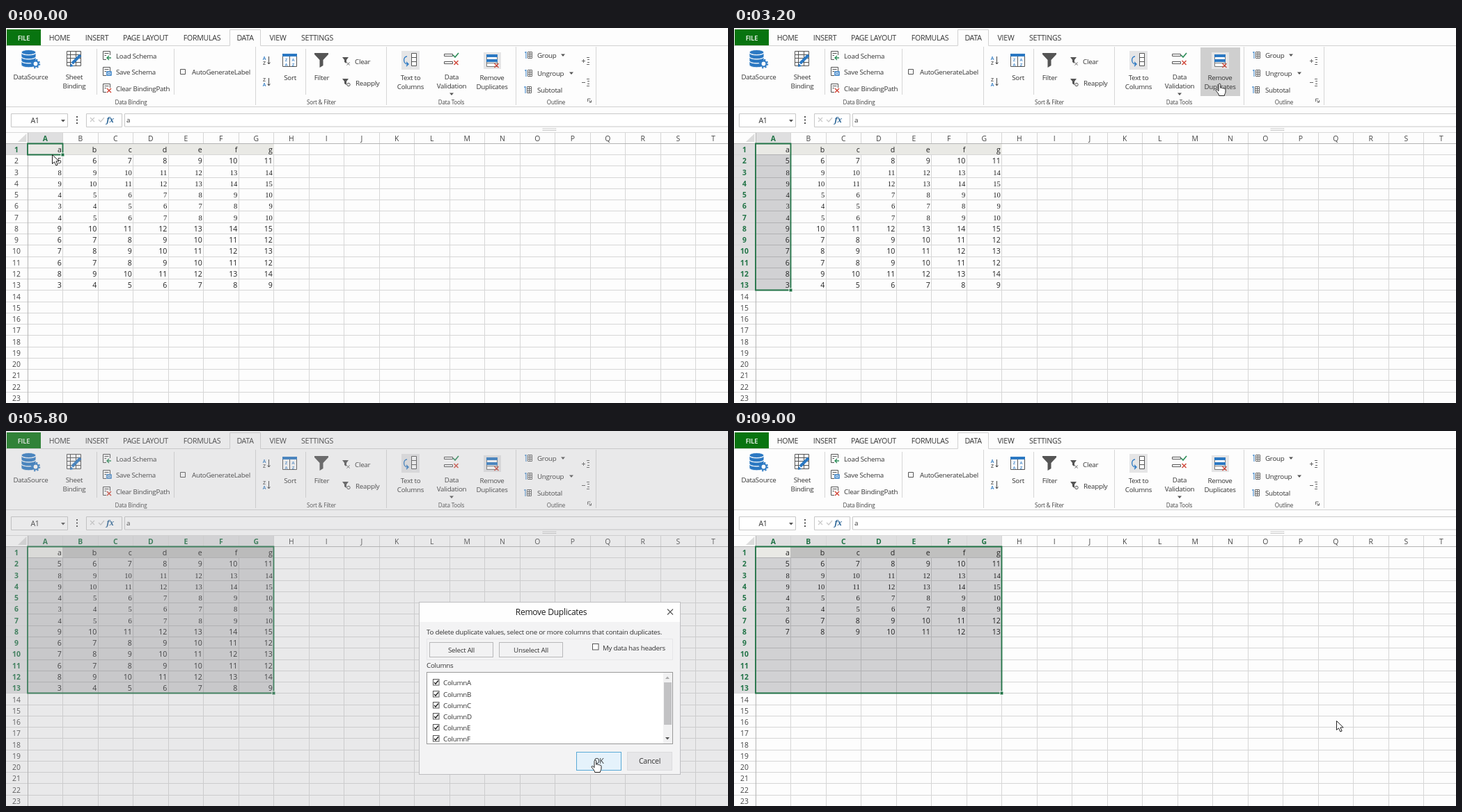
An HTML page for the animation above (9200 ms loop, 1037 by 540 pixels).

```html
<!DOCTYPE html>
<html lang="en">
<head>
<meta charset="utf-8">
<title>Remove duplicates</title>
<style>
html, body { margin: 0; width: 100%; height: 100%; overflow: hidden; background: #fdfdfd; }
svg { display: block; width: 1037px; height: 540px; }
text { font: 9.75px "Open Sans", "Noto Sans", sans-serif; letter-spacing: -.025em; fill: #333; }
.tab { font-size: 10.6px; }
.cap { font-size: 8.1px; fill: #444; }
.title { font-size: 12.1px; fill: #1c1c1c; }
.btn { font-size: 10.6px; }
.cell { font-size: 10.6px; fill: #222; letter-spacing: 0; }
.serif { font-family: "Liberation Serif", serif; }
.head { font-size: 10.4px; fill: #444; letter-spacing: 0; }
.head.on { font-weight: 700; fill: #217346; }
</style>
</head>
<body>
<svg viewBox="0 0 1037 540" xmlns="http://www.w3.org/2000/svg">
  <defs>
    <g id="doc" fill="none" stroke="#555"><path d="M.5.5h10v12h-10zM2.5 3.5h6M2.5 6.5h3"/></g>
    <path id="down" d="M-3-1.5h6L0 2z" fill="#555"/>
    <g id="outline" fill="none" stroke="#666"><path d="M4.5.5h6v9h-6zM4.5 3.5h6M4.5 6.5h6M7.5.5v9"/><path stroke="#2b78c2" d="M2 0v10M0 1h2"/></g>
    <clipPath id="list"><path d="M605 348h352v102.500h-352z"/></clipPath>
  </defs>

  <g id="ribbon">
    <path fill="#fdfdfd" d="M0 0h1037v540H0z"/>
    <path fill="#087410" d="M1 2h49v23H1z"/>
    <path fill="none" stroke="#d2d2d2" d="M0 25.500h321.500V2.500h44v23H1037M0 113.500H1037"/>
    <path fill="none" stroke="#d6d6d6" d="M130.500 30v66M241.500 30v66M430.500 30v66M358.500 27v84M546.500 27v84M732.500 27v84M847.500 27v84"/>
    <path id="hover" fill="#cfcfcf" d="M670 28h57v70h-57z"/>

    <!-- data source -->
    <g fill="#2b78c2" stroke="#fff" stroke-width=".8">
      <path d="M22 48v5c0 5 21 5 21 0v-5c-2 4-19 4-21 0zM22 42v5c0 5 21 5 21 0v-5c-2 4-19 4-21 0zM22 36v5c0 5 21 5 21 0v-5c-2 4-19 4-21 0z"/>
      <ellipse cx="32.500" cy="35" rx="10.500" ry="3.500"/>
    </g>
    <circle cx="42.500" cy="51.500" r="4" fill="#fff" stroke="#2b78c2" stroke-width="2.200"/>
    <circle cx="42.500" cy="51.500" r="5.800" fill="none" stroke="#2b78c2" stroke-width="1.800" stroke-dasharray="2.200 2.350"/>
    <!-- sheet binding -->
    <path fill="#fff" stroke="#555" d="M87.500 33.500h20v21h-20zM87.500 38.500h20M87.500 43.500h20M87.500 49.500h20M92.500 33.500v21M100.500 33.500v21"/>
    <path stroke="#2b78c2" stroke-width="4" d="M95 51 107 39"/>
    <path fill="#2b78c2" d="M92 56l1-5 4 4z"/>
    <!-- schema files -->
    <use href="#doc" x="139" y="33"/><use href="#doc" x="139" y="56"/><use href="#doc" x="139" y="80"/>
    <g fill="#fff"><path d="M144 39h8v8h-8zM144 62h8v8h-8zM144 86h8v8h-8z"/></g>
    <path fill="none" stroke="#2f8f5b" stroke-width="1.400" d="M145 43h6M148 40l-3 3 3 3"/>
    <path fill="none" stroke="#2b78c2" stroke-width="1.400" d="M145 63h6v5h-6zM146.500 65.500h3"/>
    <path stroke="#d14a3c" stroke-width="1.500" d="M145 87l6 6M151 87l-6 6"/>
    <path fill="none" stroke="#555" d="M250.500 59.500h7v7h-7z"/>
    <!-- sort -->
    <g fill="none" stroke="#444"><path d="M377.500 41v11M375.500 49.500l2 2.500 2-2.500M377.500 72v11M375.500 80.500l2 2.500 2-2.500"/></g>
    <path fill="#fff" stroke="#555" d="M397.500 37.500h20v18h-20zM407.500 40v16"/>
    <path fill="#2b78c2" d="M397 37h21v4h-21z"/>
    <!-- filters -->
    <path fill="#555" d="M443 36h20v2l-7.500 8v8l-5 3V46L443 38z"/>
    <g id="funnel"><path fill="#555" d="M483 42h9l-3 4v5l-3-2v-3z"/><path stroke="#555" d="M489.500 49.500l4 4M493.500 49.500l-4 4"/></g>
    <path fill="#555" d="M483 73h9l-3 4v5l-3-2v-3z"/><circle cx="492" cy="81.500" r="2.200" fill="none" stroke="#555"/>
    <!-- data tools -->
    <path fill="#e5e5e6" d="M568 33h26v27h-26zM686 35h25v24h-25z"/>
    <path fill="#fff" stroke="#555" d="M582.500 36.500h7v18h-7zM582.500 42.500h7M582.500 48.500h7"/>
    <path fill="none" stroke="#2b78c2" stroke-width="1.300" d="M576 41c-6 0-6 11 1 11M575 49l3 3-3 3"/>
    <path fill="none" stroke="#555" d="M629.500 37.500h12v3h-12zM629.500 48.500h12v3h-12z"/>
    <path fill="none" stroke="#2f8f5b" stroke-width="1.700" d="M642 39l3 3 5-6"/>
    <path stroke="#d14a3c" stroke-width="1.500" d="M643.500 47l6 6M649.500 47l-6 6"/>
    <path fill="#fff" stroke="#777" d="M690.500 38.500h15v17h-15zM690.500 50.500h15"/>
    <path fill="#2b78c2" d="M690 38h16v4h-16zM690 45h16v4h-16z"/>
    <path stroke="#d14a3c" stroke-width="1.400" d="M701.500 51l6 6M707.500 51l-6 6"/>
    <!-- outline -->
    <use href="#outline" x="745" y="34"/><use href="#outline" x="745" y="60"/><use href="#outline" x="744" y="84"/>
    <path fill="none" stroke="#666" d="M827 47.500h5M829.500 45v5M834 42.500h4M835 45.500h3M835 49.500h3M834 52.500h4M827 78.500h5M834 73.500h4M835 76.500h3M835 80.500h3M834 83.500h4"/>
    <path fill="none" stroke="#666" d="M835.500 106v-4h4M837 104l3 3M840.500 104v3h-3"/>
    <use href="#down" x="800" y="39"/><use href="#down" x="812" y="65"/><use href="#down" x="640" y="95"/>

    <!-- formula bar -->
    <path fill="#fff" stroke="#c8c8c8" d="M7.500 123.500h81v19h-81zM115.500 123.500h51v19h-51zM1040 123.500H170.500v18.500H1040"/>
    <use href="#down" x="82" y="133.500"/>
    <path fill="#555" d="M101 127h2v2h-2zM101 131.500h2v2h-2zM101 136h2v2h-2z"/>
    <path fill="none" stroke="#c9c9c9" stroke-width="1.200" d="M121 129l6 6M127 129l-6 6M133 132l3 3 5-6"/>
    <path stroke="#999" stroke-dasharray="1 1" d="M771 145h20M771 147.500h20"/>
  </g>

  <g id="sheet"></g>
  <g id="dim"><path fill="#aaaab0" fill-opacity=".25" d="M0 0h1037v540H0z"/></g>
  <g id="warn"></g>
  <g id="pick"></g>
  <g id="done"></g>

  <path id="arrow" fill="#fff" stroke="#222" d="M0 0v13l3-2.700 2.400 5.200 2.300-1-2.300-5.100H9.700z"/>
  <path id="hand" fill="#fff" stroke="#222" stroke-linejoin="round" d="M-1.500 1c0-1.800 2.800-1.800 2.800 0v5c.5-1 2.500-.8 2.600.4.600-.8 2.300-.6 2.500.6.700-.6 2.100-.2 2.100 1v3.500c0 2-1.500 3-1.700 5.500H-.7C-1 14.500-4 11.500-5.300 9.500c-.6-1.400 1-2 2-1l1.800 1.700z"/>
</svg>
<script>
const $ = id => document.getElementById(id);
const add = (parent, tag, attrs, label) => {
  const el = document.createElementNS('http://www.w3.org/2000/svg', tag);
  for (const key in attrs) el.setAttribute(key, attrs[key]);
  if (label !== undefined) el.textContent = label;
  return parent.appendChild(el);
};
const write = (parent, label, x, y, cls = '', anchor = 'start', extra = {}) =>
  add(parent, 'text', { x, y, class: cls, 'text-anchor': anchor, ...extra }, label);
const box = (parent, x, y, width, height, fill, stroke = 'none') =>
  add(parent, 'rect', { x, y, width, height, fill, stroke });
const line = (parent, d, stroke, width = 1) =>
  add(parent, 'path', { d, stroke, 'stroke-width': width, fill: 'none' });
const show = (el, on) => { el.style.display = on ? '' : 'none'; };

// Ribbon labels
const ribbon = $('ribbon');
write(ribbon, 'FILE', 25.5, 17.5, 'tab', 'middle', { style: 'fill:#fff;font-weight:600;font-size:9.5px' });
[['HOME', 77], ['INSERT', 130.5], ['PAGE LAYOUT', 200.5], ['FORMULAS', 281.5], ['DATA', 343.5],
  ['VIEW', 390.5], ['SETTINGS', 447]].forEach(([s, x]) => write(ribbon, s, x, 17.5, 'tab', 'middle'));
[['DataSource', 35.5, 73.5], ['Sheet', 98, 73.5], ['Binding', 98, 86.5], ['Sort', 408, 75], ['Filter', 453.5, 75],
  ['Text to', 581, 75], ['Columns', 581, 88], ['Data', 640, 73.5], ['Validation', 640, 86.5],
  ['Remove', 698, 75], ['Duplicates', 698, 88]].forEach(([s, x, y]) => write(ribbon, s, x, y, '', 'middle'));
[['Load Schema', 158, 43.5], ['Save Schema', 158, 67], ['Clear BindingPath', 158, 90.5], ['AutoGenerateLabel', 267, 67],
  ['Clear', 501, 51.5], ['Reapply', 502, 82.5], ['Group', 763, 43], ['Ungroup', 763, 68.5], ['Subtotal', 763, 93],
  ['a', 173, 136]].forEach(([s, x, y]) => write(ribbon, s, x, y));
[['Data Binding', 179.5], ['Sort & Filter', 453], ['Data Tools', 639.5], ['Outline', 790]]
  .forEach(([s, x]) => write(ribbon, s, x, 110, 'cap', 'middle'));
const glyph = (s, x, y, size, fill) => write(ribbon, s, x, y, '', 'middle', { style: `font-size:${size}px;font-weight:600;fill:${fill}` });
[['A', 371, 46], ['Z', 371, 53], ['Z', 371, 77], ['A', 371, 84]]
  .forEach(([s, x, y]) => glyph(s, x, y, 7, s === 'A' ? '#2b78c2' : '#555'));
[['Z', 402.5, 48], ['A', 402.5, 55], ['A', 412.5, 48], ['Z', 412.5, 55]].forEach(([s, x, y]) => glyph(s, x, y, 6, '#2b78c2'));
write(ribbon, 'fx', 149.5, 136, '', 'middle', { style: 'font:italic 700 11px "Noto Serif",serif;fill:#2a6496' });
const nameBox = write(ribbon, 'A1', 41.5, 137, 'tab', 'middle');

// Sheet
const sheet = $('sheet');
const colX = c => 31 + 50.5 * c;
const rowY = r => 166.3 + 16.27 * r;
const edge = v => Math.floor(v) + .5;
const COLS = 20, ROWS = 23;

line(sheet, 'M0 150.5H1037', '#d9d9d9');
add(sheet, 'path', { d: 'M17 164h12.500V152z', fill: '#dcdcdc' });
const colBand = box(sheet, 31, 151, 0, 15, '#dfdfe0');
const rowBand = box(sheet, 0, 166, 31, 0, '#dfdfe0');
let grid = '';
for (let c = 1; c < COLS; c++) grid += `M${edge(colX(c))} 151V540`;
for (let r = 1; r < ROWS; r++) grid += `M0 ${edge(rowY(r))}H1037`;
line(sheet, grid, '#d6d6d6');
line(sheet, 'M0 166.500H1037M31.500 151V540', '#b4b4b4');
box(sheet, 32, 167, 353, 15, '#e9e9e5');
const shade = add(sheet, 'path', { fill: '#0a0a14', 'fill-opacity': .18, 'fill-rule': 'evenodd' });

const colHeads = [...'ABCDEFGHIJKLMNOPQRST'].map((s, c) => write(sheet, s, colX(c) + 25.3, 163, 'head', 'middle'));
const rowHeads = Array.from({ length: ROWS }, (_, r) => write(sheet, r + 1, 15, rowY(r) + 12.7, 'head', 'middle'));

const fillRows = (values, serifEnd) => {
  const g = add(sheet, 'g', {});
  values.forEach((v, i) => {
    const cls = i > 0 && i <= serifEnd ? 'cell serif' : 'cell';
    for (let c = 0; c < 7; c++) write(g, v + c, colX(c + 1) - 1.700, rowY(i + 1) + 12.7, cls, 'end');
  });
  return g;
};
[...'abcdefg'].forEach((s, c) => write(sheet, s, colX(c + 1) - 1.700, 179, 'cell', 'end'));
const full = fillRows([5, 8, 9, 4, 3, 4, 9, 6, 7, 6, 8, 3], 5);
const unique = fillRows([5, 8, 9, 4, 3, 6, 7], 4);

const frame = add(sheet, 'path', { fill: 'none', stroke: '#217346', 'stroke-width': 1.8 });
const handle = box(sheet, 0, 0, 5, 5, '#217346', '#fff');

function select(cols, rows) {
  const right = edge(colX(cols)), bottom = edge(rowY(rows));
  shade.setAttribute('d', cols * rows > 1 ? `M31 166H${right}V${bottom}H31zM32 167V182H81V167z` : '');
  frame.setAttribute('d', `M31 166.500H${right}V${bottom}H31z`);
  handle.setAttribute('x', right - 2.5);
  handle.setAttribute('y', bottom - 2.5);
  colBand.setAttribute('width', right - 31);
  rowBand.setAttribute('height', bottom - 166);
  colHeads.forEach((h, c) => h.classList.toggle('on', c < cols));
  // A single active cell keeps its row number and letter highlighted too.
  rowHeads.forEach((h, r) => h.classList.toggle('on', r < rows));
}

// Dialogs
const button = (g, label, x, y, w, h, fill = '#e7e7e9', stroke = '#dcdcde', cls = 'btn') => {
  const b = box(g, x + .5, y + .5, w, h, fill, stroke);
  write(g, label, x + w / 2 + .5, y + h / 2 + 4.3, cls, 'middle');
  return b;
};
const heat = (b, on) => {
  b.setAttribute('fill', on ? '#e5f2fb' : '#e7e7e9');
  b.setAttribute('stroke', on ? '#5aaad6' : '#dcdcde');
};
function dialog(g, title, x, y, w, h, bar) {
  box(g, x + .5, y + .5, w, h, '#f3f3f4', '#bdbdc0');
  box(g, x + 1, y + 1, w - 1, bar, '#fefefe');
  write(g, title, 783, y + bar / 2 + 5, 'title', 'middle');
  const cx = x + w - 14, cy = y + bar / 2 + .5;
  line(g, `M${cx - 4} ${cy - 4}l8 8M${cx + 4} ${cy - 4}l-8 8`, '#555', 1.1);
}
const check = (g, x, y, on) => {
  box(g, x + .5, y + .5, 8.5, 8.5, '#fff', '#555');
  if (on) line(g, `M${x + 2} ${y + 5}l2 2.200 4-5`, '#222', 1.4);
};

const warn = $('warn');
dialog(warn, 'Remove Duplicates Warning', 630, 270, 300, 201, 28);
write(warn, 'Vaskun found data next to your selection. Because you have not', 645, 320.5);
write(warn, 'selected this data, it will not be removed.', 645, 341);
write(warn, 'What do you want to do?', 644.5, 366);
line(warn, 'M757 362.500H918', '#d5d5d7');
['Expand the selection', 'Continue with the current selection'].forEach((s, i) => {
  const y = 389 + 25 * i;
  add(warn, 'circle', { cx: 649, cy: y, r: 4.5, fill: '#fff', stroke: '#555' });
  if (!i) add(warn, 'circle', { cx: 649, cy: y, r: 2.5, fill: '#222' });
  write(warn, s, 661, y + 5);
});
const goBtn = button(warn, 'Remove Duplicates...', 715, 438, 131, 26);
button(warn, 'Cancel', 854, 438, 65, 26);

const pick = $('pick');
dialog(pick, 'Remove Duplicates', 593, 246, 375, 248, 28);
write(pick, 'To delete duplicate values, select one or more columns that contain duplicates.', 604, 293);
box(pick, 604.5, 299.5, 353, 30, 'none', '#e6e6e8');
button(pick, 'Select All', 608, 304, 91, 21, '#f2f2f3', '#b8b8ba', '');
button(pick, 'Unselect All', 708, 304, 91, 21, '#f2f2f3', '#b8b8ba', '');
check(pick, 842, 306, false);
write(pick, 'My data has headers', 857, 315.5);
write(pick, 'Columns', 604, 341);
box(pick, 604.5, 347.5, 353, 103, '#fff', '#999');
const list = add(pick, 'g', { 'clip-path': 'url(#list)' });
[...'ABCDEF'].forEach((s, i) => {
  const y = 366.3 + 16.2 * i;
  check(list, 613, Math.round(y - 9), true);
  write(list, 'Column' + s, 628, y);
});
box(pick, 944, 348, 13, 102, '#f1f1f2');
box(pick, 945, 362, 11, 61, '#c2c2c4');
add(pick, 'path', { d: 'M947 357h6l-3-3.500z', fill: '#aaa' });
add(pick, 'path', { d: 'M947 441h6l-3 3.500z', fill: '#555' });
const pickOk = button(pick, 'OK', 819, 462, 64, 26);
button(pick, 'Cancel', 892, 462, 64, 26);

const done = $('done');
dialog(done, 'VaskunJS Drafting', 646, 308, 268, 124, 28);
add(done, 'circle', { cx: 679, cy: 362, r: 13, fill: '#1f74c6' });
box(done, 677.5, 359.5, 3, 9, '#fff');
add(done, 'circle', { cx: 679, cy: 355.8, r: 1.8, fill: '#fff' });
write(done, '5 duplicate values found and removed; 8', 708, 366);
write(done, 'unique values remain.', 708, 384);
const doneOk = button(done, 'OK', 838, 400, 65, 25);

// Pointer stops: time, x, y
const path = [
  [0, 66, 182], [200, 66, 190], [400, 66, 235], [600, 66, 295], [800, 66, 350], [1000, 66, 365], [1200, 66, 365],
  [1400, 92, 350], [1600, 220, 290], [1800, 420, 200], [2000, 590, 125], [2200, 680, 88], [2400, 697, 80],
  [3400, 696, 79], [3600, 725, 250], [3800, 772, 420], [4000, 780, 450],
  [5000, 788, 455], [5200, 806, 463], [5400, 830, 471], [5600, 843, 474], [5800, 846, 474],
  [8000, 848, 468], [8200, 856, 445], [8400, 863, 424], [8600, 866, 418], [9000, 865, 417]
];
const hands = [[2200, 3400], [4000, 4400], [5400, 7400], [8400, 9000]];
const LOOP = 9200, STEP = 200;

function draw(time) {
  const t = Math.floor(time / STEP) * STEP;
  const within = (a, b) => t >= a && t < b;
  const [, x, y] = path.filter(p => p[0] <= t).pop();
  const isHand = hands.some(([a, b]) => within(a, b));
  const pointer = isHand ? $('hand') : $('arrow');
  show($('hand'), isHand);
  show($('arrow'), !isHand);
  pointer.setAttribute('transform', `translate(${x + .5} ${y + .5})`);

  const dragRows = Math.min(13, Math.max(1, Math.floor((y - 166.3) / 16.27) + 1));
  const rows = t === 0 ? 1 : t < 1200 ? dragRows : 13;
  select(t >= 4400 ? 7 : 1, rows);
  nameBox.textContent = rows > 1 && t < 1200 ? rows + 'R x 1C' : 'A1';

  show($('hover'), within(2200, 3400));
  show(warn, within(3400, 4400));
  show(pick, within(4400, 7400));
  show(done, within(7400, 9000));
  show($('dim'), within(3400, 9000));
  show(full, t < 7400);
  show(unique, t >= 7400);
  heat(goBtn, t >= 4000);
  heat(pickOk, t >= 5400);
  heat(doneOk, t >= 8400);
}

const start = performance.now();
let last = -1;
function tick() {
  const time = (performance.now() - start) % LOOP;
  const step = Math.floor(time / STEP);
  if (step !== last) draw(time);
  last = step;
  requestAnimationFrame(tick);
}
tick();
</script>
</body>
</html>
```
